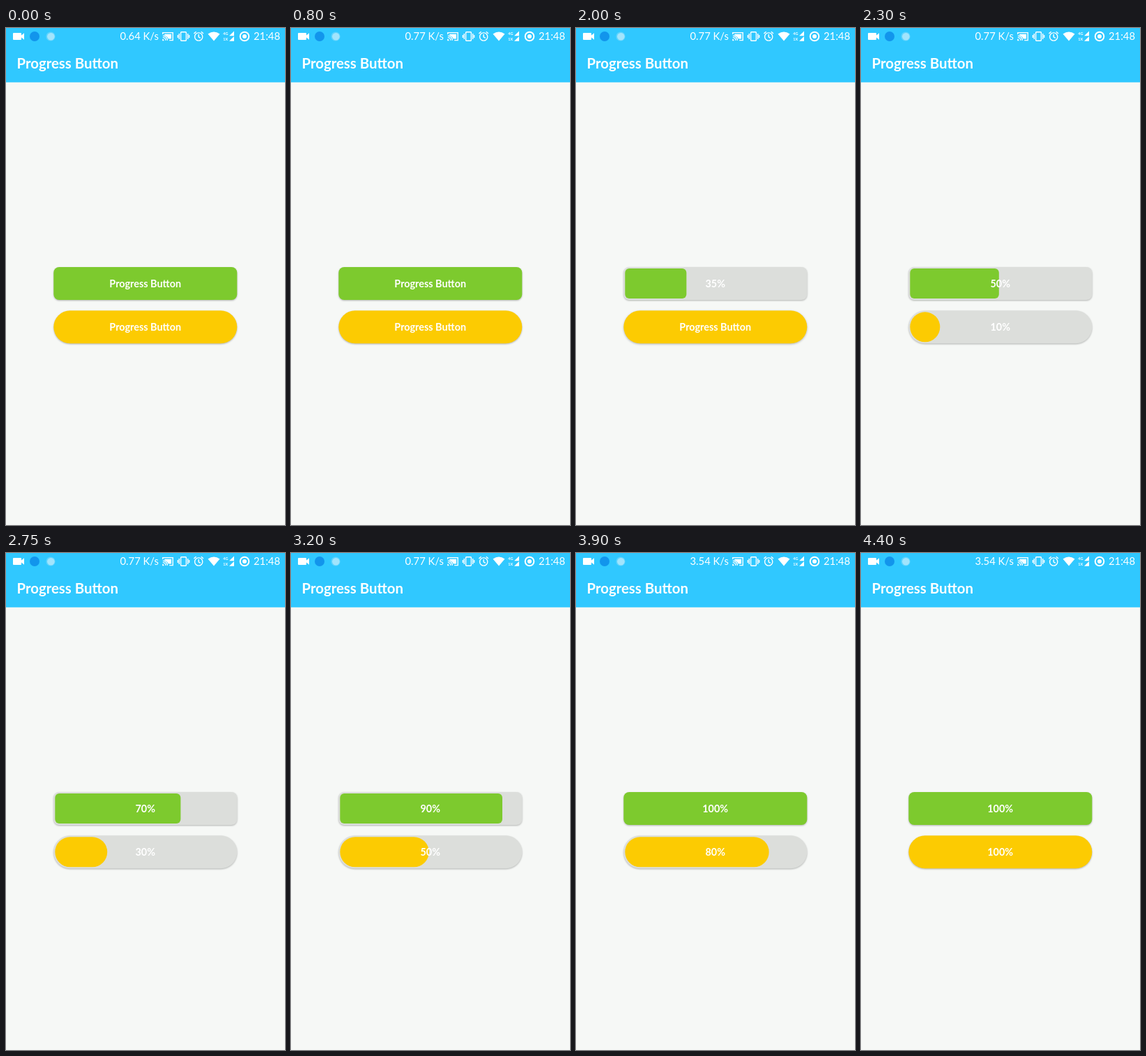
Write an HTML page that moves like this. It is 400 px wide and 711 px high and loops after 4450 ms.

```html
<!DOCTYPE html>
<html lang="en">
<head>
<meta charset="utf-8">
<title>Progress Button</title>
<style>
  html, body { margin: 0; width: 100%; height: 100%; overflow: hidden; background: #f6f8f6; }
  svg { display: block; width: 100%; height: 100%; }
  text { font-family: Lato, "Open Sans", sans-serif; fill: #fff; }
  .status { font-size: 14.8px; }
  .title { font-size: 20.4px; font-weight: 700; }
  .label { font-size: 14.4px; font-weight: 700; text-anchor: middle; }
  .tiny { font-size: 5.5px; font-weight: 700; }
  .line { fill: none; stroke: #fff; stroke-width: 1.4; }
</style>
</head>
<body>
<svg id="stage" viewBox="0 0 400 711">
  <rect width="400" height="711" fill="#f6f8f6"/>
  <rect width="400" height="77.7" fill="#30c8ff"/>
  <text class="title" x="15.5" y="58">Progress Button</text>

  <g fill="#fff">
    <path d="M11 7h10q1 0 1 1v2.6l4-3.4v9.6l-4-3.4v2.6q0 1-1 1h-10q-1 0-1-1v-8q0-1 1-1z"/>
    <circle cx="41" cy="12" r="7" fill="#1295ec"/>
    <circle cx="64" cy="12" r="6.6" fill="#5dd3fd"/>
    <circle cx="64.4" cy="12.3" r="5.3" fill="#a2e4fc"/>

    <path class="line" d="M224.8 9V6.6h14.4v11h-5M224.8 11.1a6.6 6.6 0 0 1 6.6 6.6M224.8 13.6a4.1 4.1 0 0 1 4.1 4.1"/>
    <path d="M224.2 15.8a2.4 2.4 0 0 1 2.4 2.4h-2.4zM227.2 8.8h9.8v6.8h-4.2q-1.600-4-5.600-5.200z"/>

    <rect class="line" x="250.600" y="5.800" width="7.800" height="12.400" rx="1"/>
    <path class="line" d="M248.300 8v8M260.700 8v8M246.400 10v4M262.600 10v4"/>

    <circle class="line" cx="276.200" cy="12.500" r="5.600"/>
    <path class="line" d="M276.200 9v3.800l2.600 1.600M269.400 8l3.200-2.700M283 8l-3.200-2.700"/>

    <path d="M289.500 8.600q8.500-6 17 0l-8.500 10z"/>
    <path d="M327 4.500v6.800h-7zM327 12v6.800h-7z"/>
    <text class="tiny" x="311.300" y="10">4G</text>
    <text class="tiny" x="311.300" y="18">1X</text>

    <circle class="line" cx="342" cy="12" r="6.300" stroke-width="2" style="stroke-width:2"/>
    <circle cx="342" cy="12" r="3"/>
  </g>
  <text class="status" id="speed" x="163.500" y="17.300"></text>
  <text class="status" x="355" y="17.300">21:48</text>
</svg>
<script>
const LOOP = 4450, TICK = 50;
const X = 68.3, W = 263, H = 47, INSET = 2;
const stage = document.getElementById('stage');
const speed = document.getElementById('speed');

function add(tag, attrs) {
  const el = document.createElementNS('http://www.w3.org/2000/svg', tag);
  for (const key in attrs) el.setAttribute(key, attrs[key]);
  return stage.appendChild(el);
}

// first: time of the 5% step, step: time per 5%, press: touch down
function makeButton({ y, radius, color, press, first, step }) {
  const base = add('rect', { x: X, y, width: W, height: H, rx: radius });
  const innerR = radius - INSET;
  const bar = add('rect', {
    x: X + INSET, y: y + INSET, height: H - 2 * INSET, rx: innerR, fill: color
  });
  const label = add('text', { class: 'label', x: 199.7, y: y + 28.7 });

  return t => {
    const count = Math.min(20, Math.max(0, Math.floor((t - first) / step) + 1));
    const part = count / 20;
    const active = count > 0 && count < 20;
    base.setAttribute('fill', active ? '#dcdedb' : color);
    bar.setAttribute('visibility', active ? 'visible' : 'hidden');
    bar.setAttribute('width', Math.max(2 * innerR, W * part - 2 * INSET));
    label.textContent = count ? count * 5 + '%' : 'Progress Button';

    const up = Math.min(1, Math.max(0, (t - press) / 100));
    const down = Math.min(1, Math.max(0, (t - first) / 100));
    const lift = up - down;
    base.style.filter =
      `drop-shadow(0 ${1 + lift}px ${1 + lift}px rgba(0,0,0,.28))`;
  };
}

const buttons = [
  { y: 342, radius: 8, color: '#7dca2e', press: 1060, first: 1236, step: 115.45 },
  { y: 404.3, radius: 23.5, color: '#fccb02', press: 1960, first: 2150.5, step: 116.6 }
].map(makeButton);

function draw(now) {
  const t = Math.floor(now % LOOP / TICK) * TICK;
  speed.textContent = (t < 800 ? '0.64' : t < 3600 ? '0.77' : '3.54') + ' K/s';
  buttons.forEach(update => update(t));
}

const start = performance.now();
function frame() {
  draw(performance.now() - start);
  requestAnimationFrame(frame);
}
frame();
</script>
</body>
</html>
```
